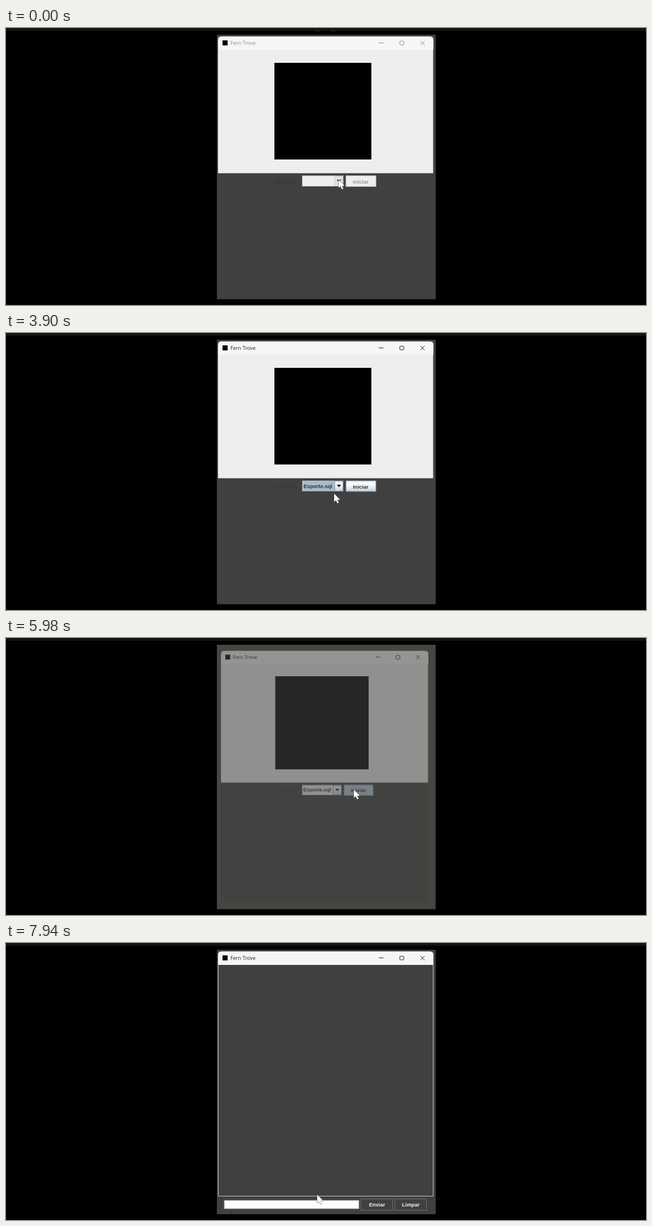
These frames come from a looping animation (1135 by 493 pixels, 8000 ms). An HTML page:

```html
<!DOCTYPE html>
<html lang="pt-BR">
<head>
<meta charset="utf-8">
<title>Fern Trove</title>
<style>
html, body { margin: 0; width: 100%; height: 100%; overflow: hidden; background: #000; }
svg { display: block; width: 100%; height: 100%; }
text { font: bold 9.4px "Liberation Sans", Arial, sans-serif; fill: #333; }
.title { font: 9.1px "Open Sans", "Noto Sans", sans-serif; fill: currentColor; }
.mid { text-anchor: middle; }

/* One 8 s timeline shared by every part */
.anim { animation: 8s linear infinite; }
.cut { animation: 8s step-end infinite; }
.backdrop { animation-name: backdrop; }
.start { animation-name: leave; transform-origin: 516px 226px; }
.quiz { animation-name: enter; transform-origin: 516px 226px; }
.pointer { animation-name: pointer; paint-order: stroke; }
.startup { animation-name: startup; }
.focus { animation-name: focus; }
.edge { animation-name: edge; }
.held { animation-name: held; }
.popup { animation-name: popup; }
.hover { animation-name: hover; }
.disabled { animation-name: disabled; }
.chosen { animation-name: chosen; }
.selected { animation-name: selected; }
.pressed { animation-name: pressed; }

@keyframes backdrop {
  0%, 73.86% { fill: #41433f; }
  73.875% { fill: #444542; }
  77.375%, 80.875% { fill: #4b4a46; }
  84.375%, 100% { fill: #41433f; }
}
@keyframes leave {
  0%, 73.86% { transform: scale(1); opacity: 1; }
  73.875% { transform: scale(.982); opacity: .68; }
  76.5%, 100% { transform: scale(.925); opacity: 0; }
}
@keyframes enter {
  0%, 80.86% { transform: scale(.908); opacity: 0; }
  80.875% { transform: scale(.908); opacity: .47; }
  81.75% { transform: scale(.955); opacity: .75; }
  82.625% { transform: scale(.982); opacity: .93; }
  84.375%, 100% { transform: scale(1); opacity: 1; }
}
@keyframes pointer {
  0%, 16.375% { transform: translate(590px, 270px); animation-timing-function: ease-in-out; }
  23.375%, 36.75% { transform: translate(580px, 286px); }
  39.375%, 48.75% { transform: translate(582px, 286px); animation-timing-function: ease-in-out; }
  58.375%, 89.625% { transform: translate(617px, 270px); animation-timing-function: ease-in-out; }
  99.25%, 100% { transform: translate(552px, 448px); }
}
@keyframes startup { 0% { visibility: visible; } .875%, 100% { visibility: hidden; } }
@keyframes focus { 0% { color: #8c8c8c; } 5.125%, 100% { color: #222; } }
@keyframes edge { 0% { stroke: #bdbdbd; } 5.125%, 100% { stroke: #8594a3; } }
@keyframes held { 0% { visibility: visible; } 8.625%, 100% { visibility: hidden; } }
@keyframes popup {
  0% { visibility: hidden; }
  5.125% { visibility: visible; }
  36.75%, 100% { visibility: hidden; }
}
@keyframes hover {
  0% { visibility: hidden; }
  19.875% { visibility: visible; }
  36.75%, 100% { visibility: hidden; }
}
@keyframes disabled { 0% { visibility: visible; } 36.75%, 100% { visibility: hidden; } }
@keyframes chosen { 0% { visibility: hidden; } 36.75%, 100% { visibility: visible; } }
@keyframes selected {
  0% { visibility: hidden; }
  36.75% { visibility: visible; }
  61.875%, 100% { visibility: hidden; }
}
@keyframes pressed { 0% { visibility: hidden; } 59.25%, 100% { visibility: visible; } }
</style>
</head>
<body>
<svg viewBox="0 0 1135 493" preserveAspectRatio="none">
  <defs>
    <linearGradient id="metal" x2="0" y2="1">
      <stop stop-color="#e4edf5"/>
      <stop offset=".35" stop-color="#fff"/>
      <stop offset="1" stop-color="#bfd0e1"/>
    </linearGradient>
    <g id="titlebar">
      <path d="M376 39V21q0-6 6-6H752q6 0 6 6V39Z" fill="#f6f6f6"/>
      <rect x="384" y="22" width="9" height="9" fill="#000"/>
      <text class="title" x="398" y="30.3">Fern Trove</text>
      <g fill="none" stroke="currentColor">
        <path d="M661 26.5H669.5M735 23l7.5 7.5M742.5 23l-7.5 7.5"/>
        <rect x="698.5" y="23.5" width="7" height="6.5" rx="1"/>
      </g>
    </g>
  </defs>

  <rect width="1135" height="493"/>
  <rect width="1135" height="5" fill="#141414"/>
  <path d="M.5 5V493" stroke="#0a0a1e"/>
  <path d="M0 492.5H1135" stroke="#140709"/>
  <path class="cut startup" d="M549 5h7M577 5h7" stroke="#444"/>
  <rect class="anim backdrop" x="374" y="12" width="388" height="470.5"/>
  <path d="M374 482H761.5V12" fill="none" stroke="#36452f"/>

  <g class="anim start">
    <rect x="376" y="38" width="382" height="443" fill="#404040"/>
    <use href="#titlebar" class="cut focus"/>
    <rect x="376" y="39" width="381.5" height="219.5" fill="#eee"/>
    <rect x="476" y="62" width="172" height="172" fill="#000"/>
    <text x="477" y="276.5" style="fill:#373737">Escolha:</text>

    <rect class="cut edge" x="525.5" y="263" width="72.5" height="18.5" fill="#eee"/>
    <rect class="cut selected" x="526.5" y="264" width="56.5" height="17" fill="#a9bacb"/>
    <rect class="cut edge" x="583" y="263.5" width="14.5" height="18" fill="url(#metal)"/>
    <rect class="cut held" x="583.5" y="264" width="13.5" height="17" fill="#e2e2e2"/>
    <path d="M586.5 270h8l-4 4.5Z" fill="#222"/>
    <text class="cut chosen" x="527.5" y="275.5">Esporte.sql</text>

    <g class="cut disabled">
      <rect x="603" y="263" width="53" height="19" fill="#eee" stroke="#d2d2d2"/>
      <text class="mid" x="629" y="276.5" style="fill:#999">Iniciar</text>
    </g>
    <rect class="cut chosen" x="603" y="263" width="53" height="19" fill="url(#metal)" stroke="#8594a3"/>
    <rect class="cut pressed" x="603" y="263" width="53" height="19" fill="#b9c9da" stroke="#8fa3b7"/>
    <text class="cut chosen mid" x="629" y="276.5">Iniciar</text>

    <g class="cut popup">
      <rect x="525.5" y="282.5" width="72" height="28" fill="#eee" stroke="#69757f"/>
      <rect class="cut hover" x="526" y="283" width="71" height="14" fill="#a3b8cc"/>
      <text x="527" y="293.8">Esporte.sql</text>
      <text x="527" y="308.3">Livros.sql</text>
    </g>
  </g>

  <g class="anim quiz" color="#222">
    <rect x="376" y="38" width="382" height="443" fill="#404040"/>
    <use href="#titlebar"/>
    <path d="M376.5 39V450.5H757.5V39" fill="none" stroke="#c8c8c8"/>
    <rect x="387" y="458" width="239" height="15" fill="#fff" stroke="#8c959d"/>
    <g fill="none" stroke="#707070">
      <rect x="629.5" y="455.5" width="56" height="20"/>
      <rect x="689.5" y="455.5" width="56" height="20"/>
    </g>
    <text class="mid" x="658" y="469.3" style="fill:#f4f4f4">Enviar</text>
    <text class="mid" x="718" y="469.3" style="fill:#f4f4f4">Limpar</text>
  </g>

  <path class="anim pointer" d="M0 0V14.5L3.3 11.5 5.7 17 8.2 16 5.8 10.7H10.4Z" fill="#fff" stroke="#444"/>
</svg>
</body>
</html>
```
